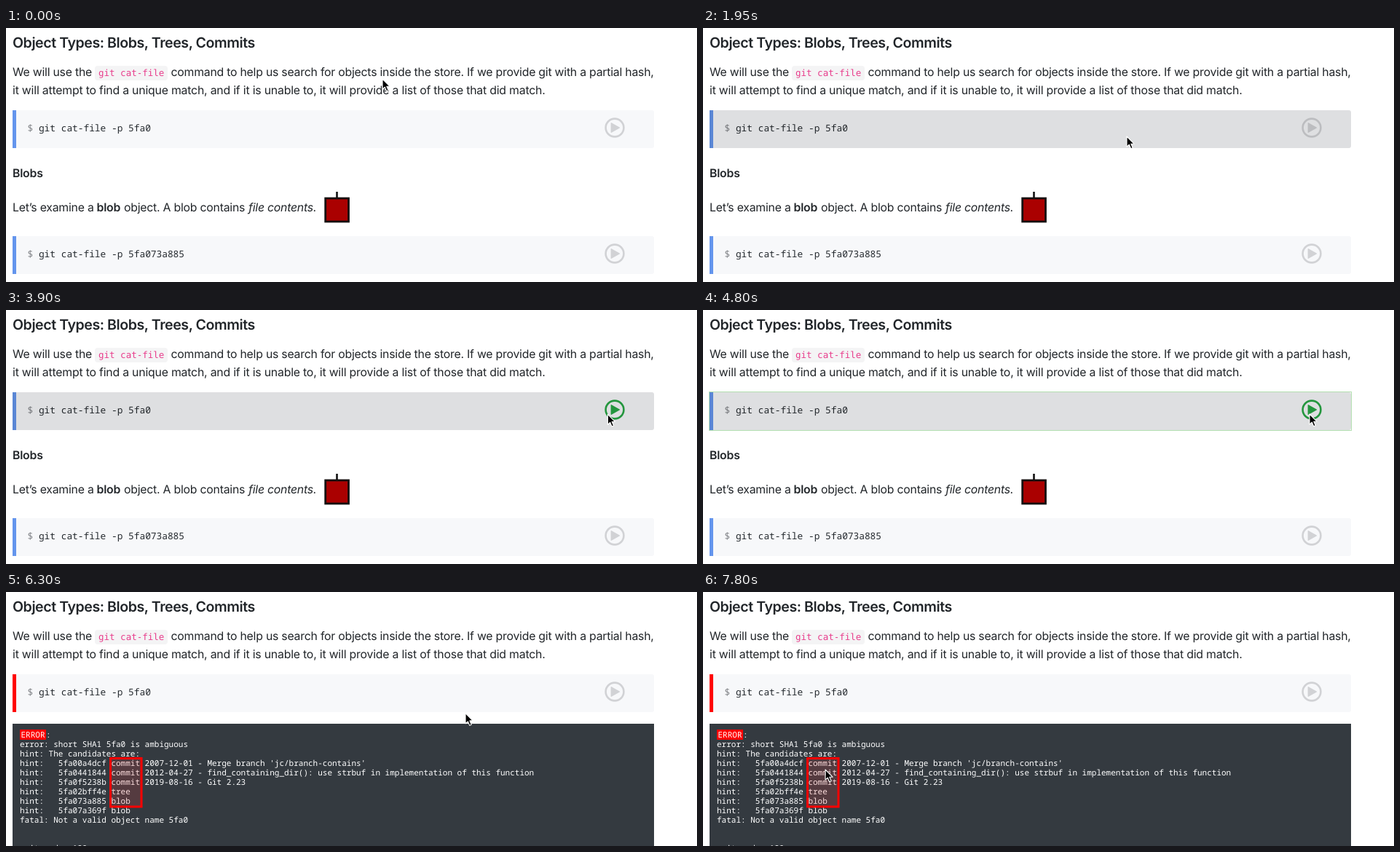
An HTML page for the animation above (8 s loop, 949 px wide and 349 px high).

```html
<!DOCTYPE html>
<html lang="en">
<head>
<meta charset="utf-8">
<title>Object Types</title>
<style>
  html, body { margin: 0; width: 100%; height: 100%; overflow: hidden; background: #fff; }
  svg { display: block; width: 100vw; height: 100vh; }
  text { white-space: pre; text-rendering: geometricPrecision; }
  .prose { font: 15.8px Inter, "Open Sans", sans-serif; letter-spacing: -.22px; fill: #212529; }
  .title { font-size: 19.6px; font-weight: 600; letter-spacing: -.44px; }
  .loose { letter-spacing: -.19px; }
  .bold { font-weight: 600; }
  .italic { font-style: italic; }
  .chip { font: 12.5px "DejaVu Sans Mono", monospace; fill: #e83e8c; }
  .code { font: 500 12.83px "Noto Sans Mono", monospace; fill: #24292e; }
  .prompt { fill: #808387; }
  .term { font: 500 11px "Noto Sans Mono", monospace; fill: #fff; }
  .icon { color: #d1d2d5; }
  .icon.active { color: #28a745; }
</style>
</head>
<body>
<svg viewBox="0 0 949 349">
  <defs>
    <g id="play">
      <circle r="12.4" fill="none" stroke="currentColor" stroke-width="2.6"/>
      <path d="M-4.7-6.2V6.2L6.4 0Z" fill="currentColor" stroke="currentColor" stroke-width="1.4" stroke-linejoin="round"/>
    </g>
    <path id="panel" d="M9 0H887a3 3 0 0 1 3 3V49a3 3 0 0 1-3 3H9Z" fill="#f7f8fa"/>
  </defs>
  <rect width="949" height="349" fill="#fff"/>

  <g class="prose">
    <text class="title" x="9" y="27">Object Types: Blobs, Trees, Commits</text>
    <text x="9" y="66">We will use the</text>
    <text x="226.5" y="66">command to help us search for objects inside the store. If we provide git with a partial hash,</text>
    <text class="loose" x="9" y="91">it will attempt to find a unique match, and if it is unable to, it will provide a list of those that did match.</text>
    <text class="bold" x="9" y="205">Blobs</text>
    <text y="251.5"><tspan x="9">Let’s examine a</tspan><tspan class="bold" x="124.5">blob</tspan><tspan x="162">object. A blob contains</tspan><tspan class="italic" x="333">file contents</tspan><tspan x="421.5">.</tspan></text>
  </g>
  <rect x="122" y="52" width="100" height="20" rx="4" fill="#f4f4f5"/>
  <text class="chip" x="127" y="66">git cat-file</text>

  <path d="M454.5 225V234" stroke="#111" stroke-width="2.6"/>
  <rect x="438.7" y="234" width="31.8" height="32" fill="#aa0000" stroke="#161010" stroke-width="2.8"/>

  <g id="command">
    <use href="#panel" y="113"/>
    <rect id="edge" x="9" y="113" width="5" height="52"/>
    <text class="code" x="29.5" y="142"><tspan class="prompt">$</tspan> git cat-file -p 5fa0</text>
    <use id="button" class="icon" href="#play" x="836" y="137"/>
  </g>
  <rect id="flash" x="8.5" y="112.5" width="882" height="53" fill="none" stroke="#b2dfb0"/>

  <use href="#panel" y="286"/>
  <rect x="9" y="286" width="5" height="52" fill="#6495ed"/>
  <text class="code" x="29.5" y="315"><tspan class="prompt">$</tspan> git cat-file -p 5fa073a885</text>
  <use class="icon" href="#play" x="836" y="310"/>

  <g id="output">
    <rect x="9" y="181" width="881" height="168" fill="#343a40"/>
    <rect x="19" y="189" width="36" height="14" fill="#f00"/>
    <g id="lines" class="term">
      <text x="20.5" y="200">ERROR<tspan x="55">:</tspan></text>
    </g>
    <rect x="143.5" y="228.5" width="42.5" height="66.5" fill="rgba(230,60,60,.18)" stroke="#f00" stroke-width="3"/>
  </g>

  <path id="cursor" d="M0 0V14.2L3.3 11.2L5.7 16.8L8.2 15.7L5.8 10.3H10.2Z" fill="#000" stroke="#fff" stroke-width="1.1" stroke-linejoin="round"/>
</svg>
<script>
const $ = id => document.getElementById(id);
const LOOP = 8000, STEP = 150;

const report = `error: short SHA1 5fa0 is ambiguous
hint: The candidates are:
hint:   5fa00a4dcf commit 2007-12-01 - Merge branch 'jc/branch-contains'
hint:   5fa0441844 commit 2012-04-27 - find_containing_dir(): use strbuf in implementation of this function
hint:   5fa0f5238b commit 2019-08-16 - Git 2.23
hint:   5fa02bff4e tree
hint:   5fa073a885 blob
hint:   5fa07a369f blob
fatal: Not a valid object name 5fa0


exit code: 128`;
report.split("\n").forEach((line, i) => {
  const text = document.createElementNS("http://www.w3.org/2000/svg", "text");
  text.setAttribute("x", 19);
  text.setAttribute("y", 213 + 13 * i);
  text.textContent = line;
  $("lines").append(text);
});

const clamp = u => Math.min(1, Math.max(0, u));
const linear = u => u;
const smooth = u => u * u * (3 - 2 * u);
const easeOut = u => Math.sin(u * Math.PI / 2);

// The pointer rests between strokes; bow bends a stroke sideways.
const home = [517, 70];
const strokes = [
  { at: 750, steps: 5, to: [526, 117], bow: [-5, 0], ease: smooth },
  { at: 1500, steps: 2, to: [556, 141], ease: linear },
  { at: 1800, steps: 2, to: [582, 149], ease: easeOut },
  { at: 2550, steps: 4, to: [639, 151], ease: smooth },
  { at: 3300, steps: 6, to: [833, 143], ease: easeOut },
  { at: 5850, steps: 6, to: [530, 168], bow: [0, 8], ease: linear },
  { at: 7050, steps: 6, to: [168, 244], ease: smooth }
];

function pointerAt(t) {
  let from = home;
  for (const { at, steps, to, bow = [0, 0], ease } of strokes) {
    if (t < at) break;
    const done = clamp((Math.floor((t - at) / STEP) + 1) / steps);
    const u = ease(done), bend = Math.sin(Math.PI * done);
    from = from.map((start, i) => start + (to[i] - start) * u + bow[i] * bend);
  }
  return from;
}

const show = (id, on) => { $(id).style.display = on ? "" : "none"; };

function draw(time) {
  const t = Math.floor(time / STEP) * STEP;
  const [x, y] = pointerAt(t);
  const hover = clamp((t - 1350) / 300) - clamp((t - 6000) / 300);
  const failed = t >= 5100;

  $("cursor").setAttribute("transform", `translate(${x} ${y})`);
  $("command").style.filter = hover ? `brightness(${1 - hover / 10})` : "none";
  $("edge").setAttribute("fill", failed ? "#f00" : "#6495ed");
  $("button").classList.toggle("active", Math.hypot(x - 836, y - 137) < 14);
  show("flash", t >= 4800 && !failed);
  show("output", failed);
}

const begin = performance.now();
function tick() {
  draw((performance.now() - begin) % LOOP);
  requestAnimationFrame(tick);
}
tick();
</script>
</body>
</html>
```
